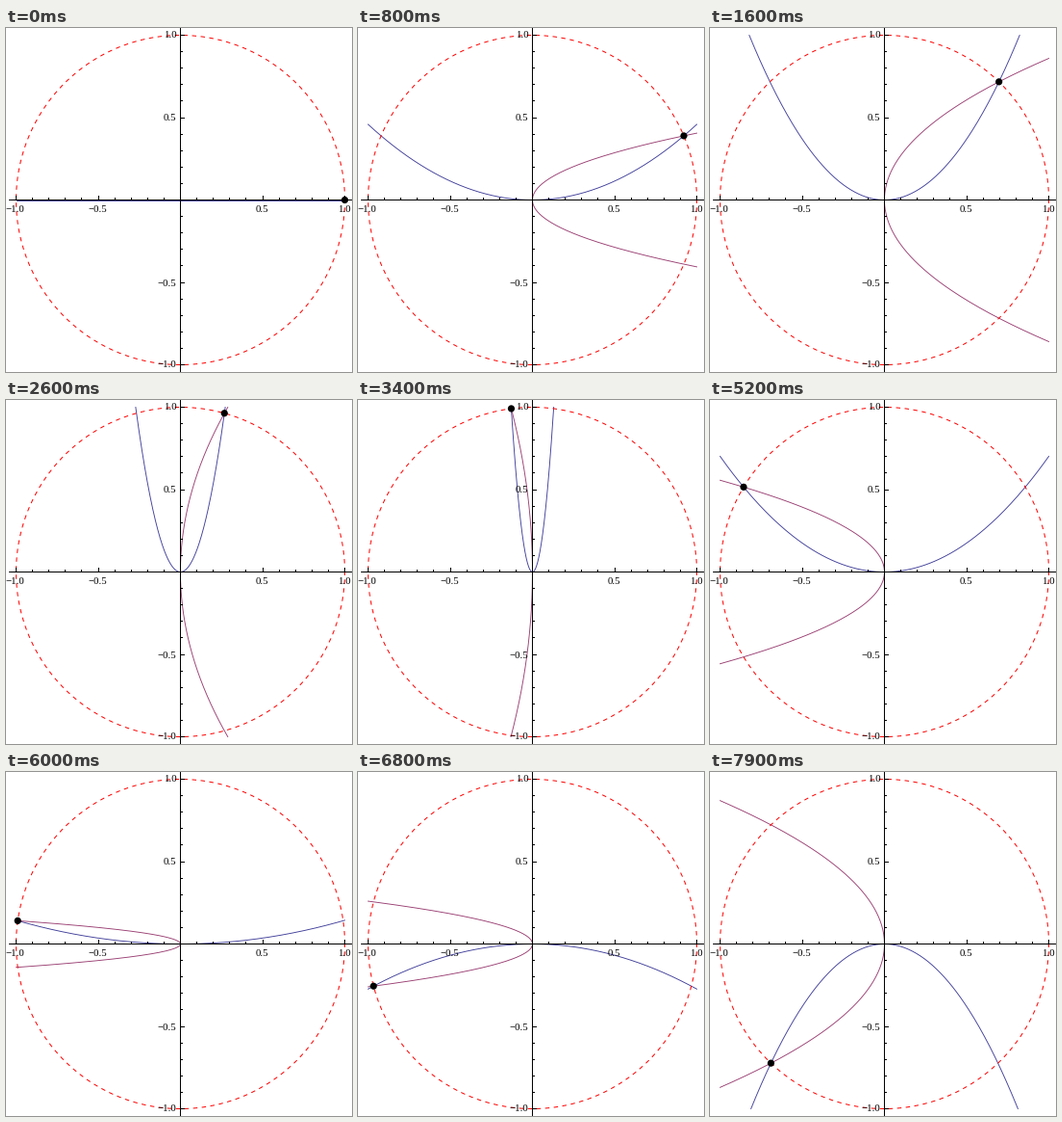
A matplotlib script for the animation above (8000 ms loop, 360 by 357 pixels).

```python
import numpy as np
import matplotlib.pyplot as plt
from matplotlib.animation import FuncAnimation
from matplotlib.patches import Circle, Rectangle

W, H, DPI = 360, 357, 72          # at 72 dpi one point is one pixel
CX, CY, R = 181.5, 178.5, 171
FRAMES, INTERVAL, STEP = 80, 100, 0.05
BLUE, PURPLE = (0.247, 0.24, 0.6), (0.6, 0.24, 0.443)

fig = plt.figure(figsize=(W / DPI, H / DPI), dpi=DPI, facecolor="white")
ax = fig.add_axes([0, 0, 1, 1])
ax.set_xlim(0, W)
ax.set_ylim(H, 0)
ax.axis("off")


def px(x, y):
    return CX + R * np.asarray(x), CY - R * np.asarray(y)


def bar(x, y, w, h):
    """Crisp black bar on whole pixels."""
    ax.add_patch(Rectangle((x, y), w, h, fc="black", lw=0, snap=False,
                           zorder=4))


def label(x, y, value, ha):
    text = f"{value:.1f}".replace("-", "\u2212")
    ax.text(x, y, text, family="Liberation Serif", size=10.9, ha=ha,
            va="baseline", zorder=5)


def draw_axes():
    row, col = int(CY), int(CX)
    bar(3, row, 357, 1)
    bar(col, 0, 1, 357)
    for k in range(-10, 11):
        if k == 0:
            continue
        major = k % 5 == 0
        size = 4 if major else 2
        x, y = (int(v) for v in px(k / 10, k / 10))
        bar(x, row - size, 1, size)
        bar(col + 1, y, size, 1)
        if major:
            label(x - 0.5, 191, k / 10, "center")
            label(177.3, y + 3.5, k / 10, "right")


def parabola(height, half):
    """Samples of u and height * u^2 / half^2, kept inside the unit square."""
    end = min(1, abs(half) / np.sqrt(max(abs(height), 1e-9)))
    u = np.linspace(-end, end, 201)
    return u, height * (u / half) ** 2


draw_axes()
t = np.linspace(0, 2 * np.pi, 721)
ax.plot(*px(np.cos(t), np.sin(t)), color="red", lw=1, dashes=(4.5, 4.5),
        dash_capstyle="butt", zorder=3)
blue, = ax.plot([], [], color=BLUE, lw=0.9, zorder=1)
purple, = ax.plot([], [], color=PURPLE, lw=0.9, zorder=2)
dot = ax.add_patch(Circle(px(1, 0), 3.6, fc="black", lw=0, snap=False,
                          zorder=6))


def update(i):
    c, s = np.cos(STEP * i), np.sin(STEP * i)
    u, v = parabola(s, c)
    blue.set_data(*px(u, v))
    if i:
        u, v = parabola(c, s)
        purple.set_data(*px(v, u))
    else:
        purple.set_data([], [])
    dot.center = px(c, s)
    return blue, purple, dot


anim = FuncAnimation(fig, update, frames=FRAMES, interval=INTERVAL,
                     repeat=True, repeat_delay=0)
plt.show()
```
